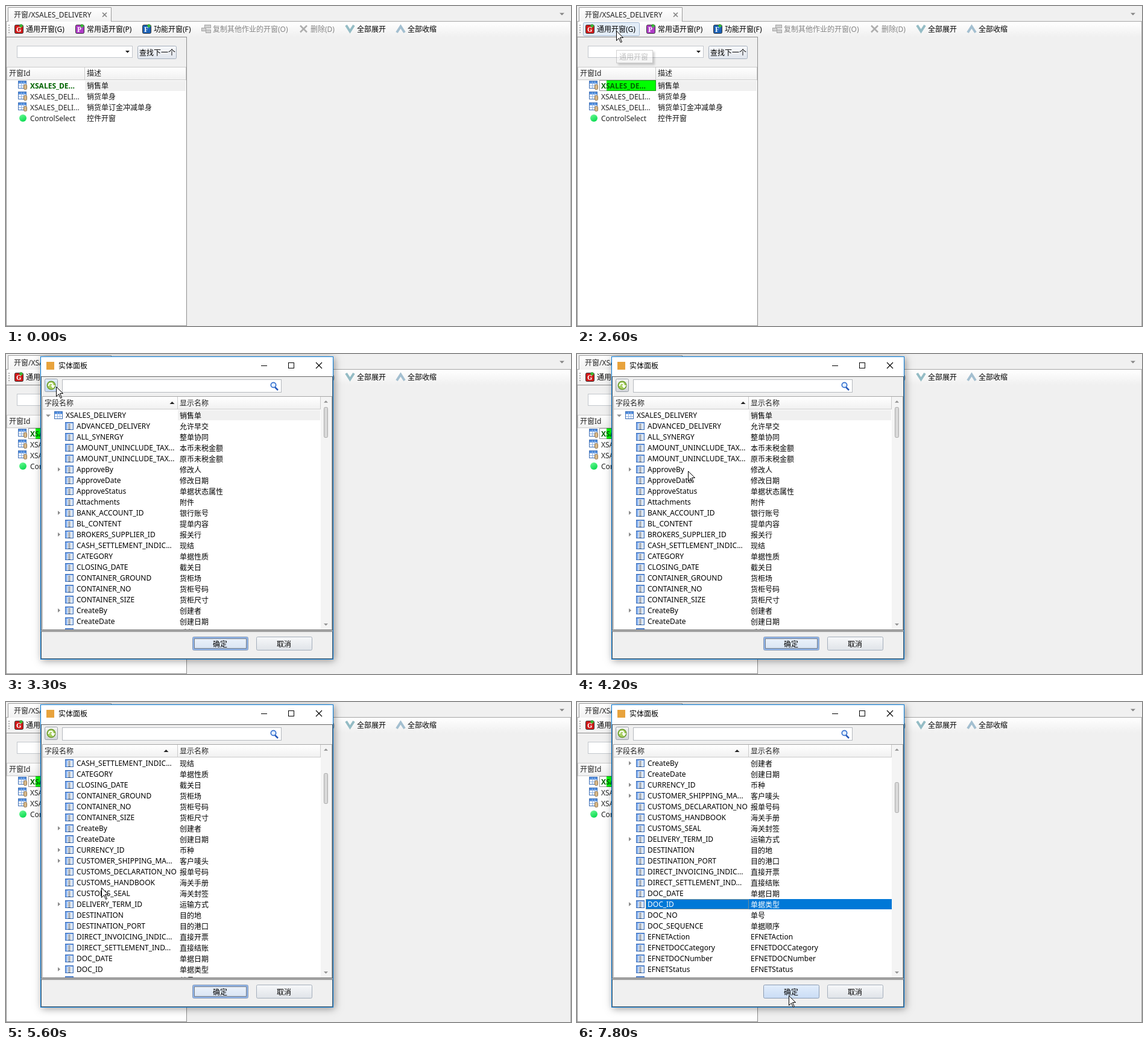
An HTML page with a canvas that plays this animation: 937x531 px, repeating every 8 s.

```html
<!DOCTYPE html>
<html lang="zh-CN">
<head>
<meta charset="utf-8">
<style>
html, body { margin: 0; width: 100%; height: 100%; overflow: hidden; background: #f0f0f0; }
canvas { display: block; }
</style>
</head>
<body>
<canvas id="stage" width="937" height="531"></canvas>
<script>
const stage = document.getElementById('stage').getContext('2d');
const layer = stage.canvas.cloneNode().getContext('2d');
let ctx = stage;
const LOOP = 8000, STEP = 100;
const FONT = '12px "Noto Sans", "Noto Sans CJK SC", "Noto Sans CJK", sans-serif';

// Pointer stops: time, x, y
const POINTER = [
  [300, 818, 150], [600, 350, 155], [900, 2, 110], [1100, 120, 62], [1200, 161, 55],
  [1400, 107, 135], [1700, 107, 128], [1900, 107, 128], [2400, 65, 41], [3200, 65, 41],
  [3800, 175, 116], [4000, 192, 150], [4200, 184, 194], [4400, 184, 194], [5000, 158, 308],
  [5900, 158, 308], [6100, 215, 350], [6300, 147, 340], [7000, 147, 340], [7400, 338, 468],
  [7800, 351, 487]
];
// Wheel turns: time, first visible row
const SCROLL = [[5100, 3], [5300, 6], [5400, 9], [5600, 12], [5700, 15], [5800, 18]];

// A leading + marks a row that can be expanded
const FIELDS = `XSALES_DELIVERY|销售单
ADVANCED_DELIVERY|允许早交
ALL_SYNERGY|整单协同
AMOUNT_UNINCLUDE_TAX...|本币未税金额
AMOUNT_UNINCLUDE_TAX...|原币未税金额
+ApproveBy|修改人
ApproveDate|修改日期
ApproveStatus|单据状态属性
Attachments|附件
+BANK_ACCOUNT_ID|银行账号
BL_CONTENT|提单内容
+BROKERS_SUPPLIER_ID|报关行
CASH_SETTLEMENT_INDIC...|现结
CATEGORY|单据性质
CLOSING_DATE|截关日
CONTAINER_GROUND|货柜场
CONTAINER_NO|货柜号码
CONTAINER_SIZE|货柜尺寸
+CreateBy|创建者
CreateDate|创建日期
+CURRENCY_ID|币种
+CUSTOMER_SHIPPING_MA...|客户唛头
CUSTOMS_DECLARATION_NO|报单号码
CUSTOMS_HANDBOOK|海关手册
CUSTOMS_SEAL|海关封签
+DELIVERY_TERM_ID|运输方式
DESTINATION|目的地
DESTINATION_PORT|目的港口
DIRECT_INVOICING_INDIC...|直接开票
DIRECT_SETTLEMENT_IND...|直接结账
DOC_DATE|单据日期
+DOC_ID|单据类型
DOC_NO|单号
DOC_SEQUENCE|单据顺序
EFNETAction|EFNETAction
EFNETDOCCategory|EFNETDOCCategory
EFNETDOCNumber|EFNETDOCNumber
EFNETStatus|EFNETStatus
|`.split('\n').map(line => line.split('|'));
const DOC_ID_ROW = 31;

function rect(x, y, w, h, fill) {
  ctx.fillStyle = fill;
  ctx.fillRect(x, y, w, h);
}

function frame(x, y, w, h, color, dash = []) {
  ctx.strokeStyle = color;
  ctx.lineWidth = 1;
  ctx.setLineDash(dash);
  ctx.strokeRect(x + .5, y + .5, w - 1, h - 1);
  ctx.setLineDash([]);
}

function box(x, y, w, h, fill, border) {
  rect(x, y, w, h, fill);
  frame(x, y, w, h, border);
}

function text(s, x, baseline, color = '#000', bold = false) {
  ctx.font = (bold ? 'bold ' : '') + FONT;
  ctx.fillStyle = color;
  ctx.fillText(s, x, baseline);
}

function line(points, color, width = 1) {
  ctx.strokeStyle = color;
  ctx.lineWidth = width;
  ctx.beginPath();
  points.forEach(([x, y]) => ctx.lineTo(x, y));
  ctx.stroke();
}

function shape(points, fill) {
  ctx.fillStyle = fill;
  ctx.beginPath();
  points.forEach(([x, y]) => ctx.lineTo(x, y));
  ctx.closePath();
  ctx.fill();
}

function circle(x, y, r, fill) {
  ctx.fillStyle = fill;
  ctx.beginPath();
  ctx.arc(x, y, r, 0, 7);
  ctx.fill();
}

function shade(x0, y0, x1, y1, from, to) {
  const g = ctx.createLinearGradient(x0, y0, x1, y1);
  g.addColorStop(0, from);
  g.addColorStop(1, to);
  return g;
}

function triangle(x, y, size, dir, color) {
  shape([[x - size, y - dir * size / 2], [x + size, y - dir * size / 2], [x, y + dir * size / 2]], color);
}

function cross(x, y, r, color, width) {
  line([[x - r, y - r], [x + r, y + r]], color, width);
  line([[x - r, y + r], [x + r, y - r]], color, width);
}

function button(x, y, w, h, fill, border) {
  ctx.beginPath();
  ctx.roundRect(x + .5, y + .5, w - 1, h - 1, 2);
  ctx.fillStyle = fill;
  ctx.fill();
  ctx.strokeStyle = border;
  ctx.lineWidth = 1;
  ctx.stroke();
}

// Draws a group as one translucent picture, scaled about (cx, cy)
function fade(alpha, drawGroup, scale = 1, cx = 0, cy = 0) {
  const { width, height } = stage.canvas;
  ctx = layer;
  ctx.clearRect(0, 0, width, height);
  drawGroup();
  ctx = stage;
  ctx.save();
  ctx.globalAlpha = alpha;
  ctx.translate(cx, cy);
  ctx.scale(scale, scale);
  ctx.drawImage(layer.canvas, -cx, -cy);
  ctx.restore();
}

function tableIcon(x, y) {
  box(x, y, 14, 13, '#fff', '#3f6fb5');
  rect(x + 1, y + 1, 12, 3, '#4f8ee0');
  for (const d of [5, 9]) {
    rect(x + d, y + 1, 1, 11, '#8fb2e3');
    rect(x + 1, y + d - 1, 12, 1, '#8fb2e3');
  }
}

function fieldIcon(x, y) {
  box(x, y, 14, 13, '#fff', '#3f6fb5');
  rect(x + 1, y + 1, 12, 1, '#5d92e6');
  rect(x + 1, y + 2, 3, 10, '#8db6f2');
  rect(x + 10, y + 2, 3, 10, '#cfe0f8');
  for (let d = 3; d < 12; d += 2) rect(x + 5, y + d, 4, 1, '#5c6672');
}

function letterIcon(x, letter, color) {
  button(x, 31, 15, 15, color, '#333');
  ctx.font = 'bold 11px "Noto Serif", serif';
  ctx.fillStyle = '#fff';
  ctx.fillText(letter, x + 3, 43);
  rect(x + 10, 30, 2, 6, '#35c435');
  rect(x + 8, 32, 6, 2, '#35c435');
}

function tooltip(s, x, y, w, h) {
  ctx.save();
  ctx.shadowColor = 'rgba(0,0,0,.5)';
  ctx.shadowBlur = 3;
  ctx.shadowOffsetX = ctx.shadowOffsetY = 3;
  rect(x, y, w, h, '#fff');
  ctx.restore();
  frame(x, y, w, h, '#767676');
  text(s, x + 5, y + h / 2 + 5, '#575757');
}

function drawToolbar(t) {
  rect(1, 26, 935, 25, shade(0, 26, 0, 51, '#fff', '#f0f0f0'));
  for (let y = 31; y < 46; y += 4) rect(4, y, 2, 2, '#b0b0b0');
  if (t >= 2400 && t < 3100) {
    button(10, 27, 94, 23, t < 3000 ? '#e3edf8' : '#c9dcf1', '#a3b8d0');
  }
  letterIcon(14, 'G', '#d21a1a');
  letterIcon(115, 'P', '#b03cc8');
  letterIcon(226, 'F', '#1c62b8');
  text('通用开窗(G)', 33, 43);
  text('常用语开窗(P)', 134, 43);
  text('功能开窗(F)', 245, 43);
  box(329, 31, 11, 6, '#d0d0d0', '#a5a5a5');
  box(324, 36, 8, 6, '#d0d0d0', '#a5a5a5');
  box(331, 39, 9, 6, '#d0d0d0', '#a5a5a5');
  text('复制其他作业的开窗(O)', 343, 43, '#858585');
  cross(493.5, 38, 5.5, '#adadad', 2.5);
  text('删除(D)', 505, 43, '#858585');
  line([[564, 32], [570.5, 42], [577, 32]], '#94bcc5', 4);
  text('全部展开', 582, 43);
  line([[648, 44], [654.5, 34], [661, 44]], '#a3bfd0', 4);
  text('全部收缩', 666, 43);
}

function drawList(t) {
  box(0, 51, 300, 480, '#fff', '#8e8e8e');
  rect(1, 52, 298, 49, '#f0f0f0');
  box(18, 66, 192, 20, '#fff', '#c3c7cc');
  triangle(201.5, 76, 3.5, 1, '#000');
  button(218, 66, 65, 22, shade(0, 66, 0, 88, '#f9fafc', '#dfe4ec'), '#a4aebb');
  text('查找下一个', 221, 82);
  box(1, 101, 298, 22, shade(0, 101, 0, 123, '#fff', '#f0f0f0'), '#cbcbcb');
  rect(130, 102, 1, 20, '#cbcbcb');
  text('开窗Id', 5, 116, '#222');
  text('描述', 134, 116, '#222');

  rect(131, 124, 167, 17, '#f0f0f0');
  if (t >= 1700) {
    rect(49, 123, 82, 18, '#00ff00');
    frame(37, 123, 94, 18, '#333', [1, 1]);
  }
  const rows = [['XSALES_DE...', '销售单'], ['XSALES_DELI...', '销货单身'],
    ['XSALES_DELI...', '销货单订金冲减单身'], ['ControlSelect', '控件开窗']];
  rows.forEach(([id, label], i) => {
    const y = 123 + i * 18;
    if (i < 3) {
      tableIcon(20, y + 1);
      button(29, y + 7, 6, 9, '#d9b98a', '#8d7047');
    } else {
      circle(28, y + 9, 6, shade(24, y, 32, y + 15, '#7dffa0', '#00d84a'));
    }
    text(id, 40, y + 14, i ? '#222' : '#006400', i === 0);
    text(label, 134, y + 14, '#111');
  });
}

function drawBase(t) {
  rect(0, 0, 937, 531, '#f0f0f0');
  rect(0, 25, 937, 1, '#a5a5a5');
  rect(3, 2, 172, 24, shade(0, 2, 0, 26, '#fff', '#f2f2f2'));
  line([[3.5, 26], [3.5, 2.5], [174.5, 2.5], [174.5, 26]], '#9c9c9c');
  text('开窗/XSALES_DELIVERY', 13, 19, '#222');
  cross(163.5, 14.5, 3.5, '#858585', 1.7);
  triangle(922, 13.5, 4, 1, '#858585');
  drawToolbar(t);
  rect(0, 26, 1, 25, '#a5a5a5');
  rect(936, 26, 1, 505, '#a5a5a5');
  drawList(t);
}

function drawRows(t, top) {
  ctx.save();
  ctx.beginPath();
  ctx.rect(61, 92, 461, 365);
  ctx.clip();
  for (let i = top; i < Math.min(top + 21, FIELDS.length); i++) {
    const y = 92 + (i - top) * 18;
    const [name, label] = FIELDS[i];
    const selected = i === DOC_ID_ROW && t >= 6900;
    const color = selected ? '#fff' : '#000';
    if (i === 0) {
      rect(285, y + 1, 236, 17, '#f0f0f0');
      tableIcon(80, y + 3);
      triangle(70, y + 10.5, 4, 1, '#909090');
    } else {
      fieldIcon(98, y + 3);
    }
    if (selected) {
      rect(114, y + 1, 408, 17, '#0078d7');
      frame(114, y + 1, 171, 17, '#e0a060', [1, 1]);
    }
    if (name[0] === '+') shape([[86, y + 6], [90, y + 9.5], [86, y + 13]], '#8b8b8b');
    text(name.replace('+', ''), i ? 117 : 99, y + 14, color);
    text(label, 288, y + (/[A-Z]/.test(label) ? 14 : 15), color);
  }
  ctx.restore();
}

function drawTree(t) {
  const top = SCROLL.reduce((row, [time, value]) => t >= time ? value : row, 0);
  box(60, 70, 481, 388, '#fff', '#a5a5a5');
  rect(61, 71, 461, 21, shade(0, 71, 0, 92, '#fff', '#f0f0f0'));
  rect(61, 91, 461, 1, '#cbcbcb');
  rect(284, 71, 1, 21, '#cbcbcb');
  rect(521, 71, 1, 21, '#cbcbcb');
  text('字段名称', 64, 86, '#222');
  text('显示名称', 288, 86, '#222');
  triangle(t >= 3200 && t < 4700 ? 275.5 : 265.5, 81, 4, -1, '#222');
  drawRows(t, top);
  rect(522, 71, 18, 386, '#f4f4f4');
  triangle(530.5, 79, 3.5, -1, '#909090');
  triangle(530.5, 449, 3.5, 1, '#909090');
  button(527, 88 + top * 2.5, 7, 51, '#d9d9d9', '#a9a9a9');
}

function drawDialog(t) {
  ctx.save();
  ctx.shadowColor = 'rgba(0,0,0,.4)';
  ctx.shadowBlur = 12;
  ctx.shadowOffsetX = ctx.shadowOffsetY = 2;
  rect(57, 4, 486, 503, '#f0f0f0');
  ctx.restore();
  rect(58, 5, 484, 32, '#fff');
  rect(67, 13, 13, 13, '#e8a33d');
  text('实体面板', 87, 24);
  rect(423, 19, 10, 1, '#000');
  frame(468, 14, 10, 10, '#000');
  cross(519, 19, 5, '#000', 1.1);

  const refreshHover = t < 3400;
  button(64, 41, 22, 22, shade(0, 41, 0, 63, refreshHover ? '#e3eefc' : '#f6f6f6', refreshHover ? '#c3d8f3' : '#d0d3d8'), '#9aa0a8');
  circle(75, 52, 7.5, '#6a9a2d');
  circle(75, 52, 6, '#a8cf62');
  line([[70.5, 53], [72, 49], [76, 48.5], [78, 52]], '#fff', 2);
  shape([[74, 52], [82, 52], [78, 57]], '#fff');
  box(93, 42, 364, 22, '#fff', '#b5b9be');
  line([[446, 55], [451, 60]], '#2557b8', 2.5);
  circle(443.5, 51.5, 5, '#3471d0');
  circle(443.5, 51.5, 3.3, '#e6f1ff');

  drawTree(t);
  frame(58, 37, 484, 422, '#646464');
  frame(58, 460, 484, 46, '#646464');

  const hover = t >= 7500;
  const okFill = hover ? shade(0, 469, 0, 492, '#e3eefc', '#c9dcf5') : shade(0, 469, 0, 492, '#eef4fc', '#d6e2f2');
  button(309, 469, 93, 23, okFill, '#8a9bb3');
  if (!hover) {
    frame(310, 470, 91, 21, '#8fb4ea');
    frame(311, 471, 89, 19, '#8fb4ea');
    frame(312, 472, 87, 17, '#111', [1, 1]);
  }
  button(415, 469, 93, 23, shade(0, 469, 0, 492, '#f7f8fa', '#dfe3e8'), '#a4aebb');
  text('确定', 343, 486);
  text('取消', 449, 486);
  frame(57, 4, 486, 503, '#0078d7');
}

function drawPointer(t) {
  if (t < POINTER[0][0]) return;
  const next = POINTER.findIndex(p => p[0] > t);
  const b = POINTER.at(next), a = next < 0 ? b : POINTER[next - 1];
  const k = a === b ? 0 : (t - a[0]) / (b[0] - a[0]);
  ctx.save();
  ctx.translate(Math.round(a[1] + (b[1] - a[1]) * k) + .5, Math.round(a[2] + (b[2] - a[2]) * k) + .5);
  const arrow = [[0, 0], [0, 16], [4, 12], [7, 19], [9, 18], [6, 11], [11, 11], [0, 0]];
  shape(arrow, '#fff');
  line(arrow, '#000');
  ctx.restore();
}

function draw(now) {
  const t = Math.floor(now % LOOP / STEP) * STEP;
  drawBase(t);
  if (t >= 3200) drawDialog(t);
  else if (t >= 3100) fade(.82, () => drawDialog(t), .988, 300, 255.5);

  if (t >= 2600 && t < 3200) {
    const alpha = t < 3100 ? Math.min(1, (t - 2500) / 300) : .6;
    fade(alpha, () => tooltip('通用开窗', 65, 73, 61, 22));
  }
  if (t >= 6600 && t < 6900) {
    fade(t < 6700 ? .5 : 1, () => tooltip('DOC_ID', 146, 361, 55, 26));
  }
  drawPointer(t);
}

const start = performance.now();
function tick() {
  draw(performance.now() - start);
  requestAnimationFrame(tick);
}
tick();
</script>
</body>
</html>
```
